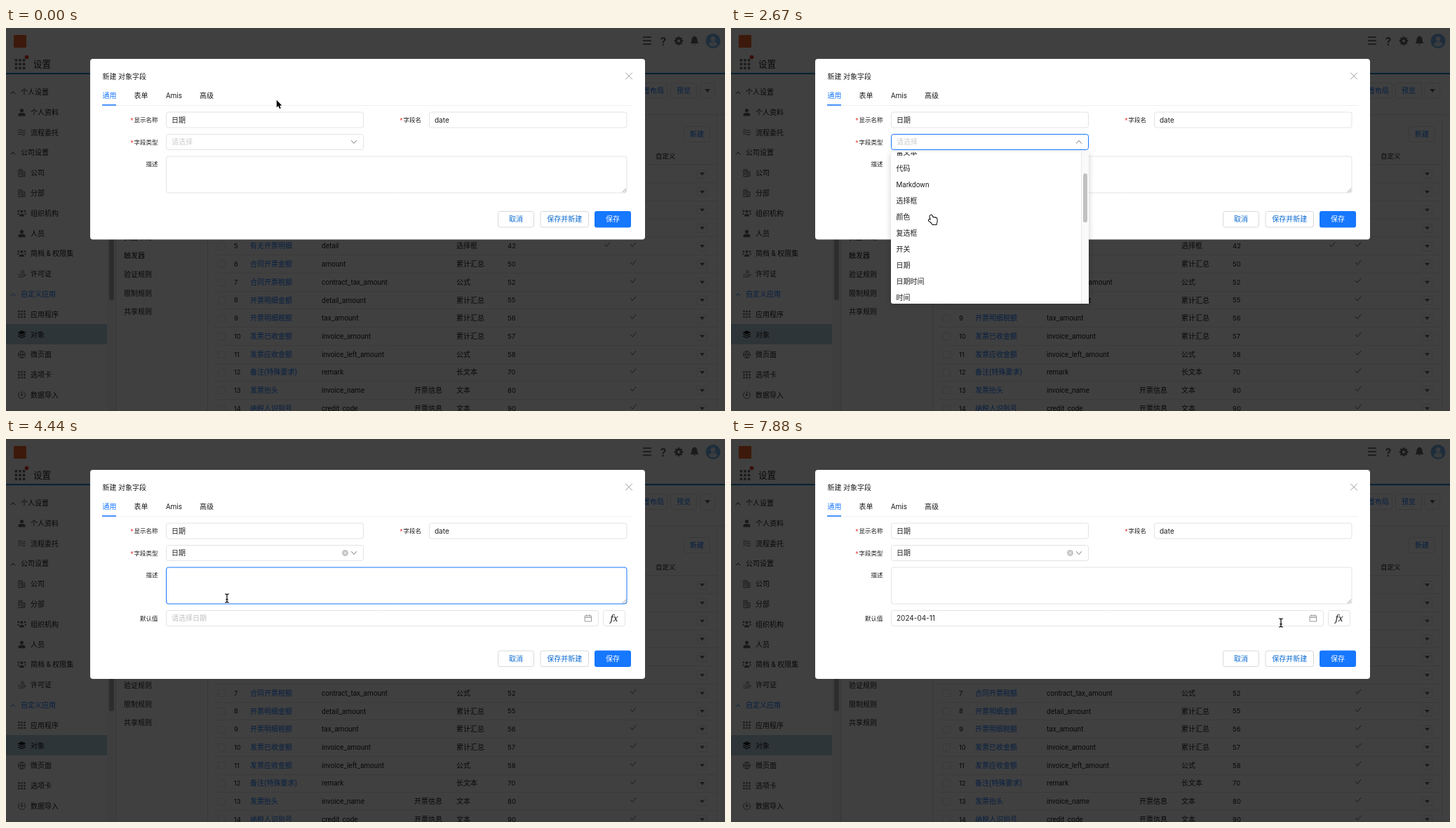
Write an HTML page with a canvas that moves like this. It is 1025 by 546 pixels and loops after 8000 ms.

```html
<!DOCTYPE html>
<html lang="zh-CN">
<head>
<meta charset="utf-8">
<title>新建 对象字段</title>
<style>
html, body { margin: 0; width: 100%; height: 100%; overflow: hidden; background: #404040; }
canvas { display: block; }
</style>
</head>
<body>
<canvas id="stage" width="1025" height="546"></canvas>
<script>
const c = document.getElementById('stage').getContext('2d');
const LOOP = 8000, BLUE = '#1677ff', INK = '#1f1f1f', LINE = '#e3e3e3', HINT = '#bfbfbf', GREY = '#666';
const CJK = '"Noto Sans CJK SC", "Noto Sans CJK", sans-serif';
const UI = 'Roboto, ' + CJK, FIELD = 'Inter, ' + CJK;

// ---- drawing helpers ----
function text(s, x, y, { size = 10, color = INK, align = 'left', weight = 400, font = UI } = {}) {
  c.font = `${weight} ${size}px ${font}`;
  c.textAlign = align;
  c.fillStyle = color;
  c.fillText(s, x, y + size * 0.37);
}
function rect(x, y, w, h, color) {
  c.fillStyle = color;
  c.fillRect(x, y, w, h);
}
// A stroke lies inside the given bounds; a plain fill covers them fully.
function box(x, y, w, h, { r = 3, fill = '#fff', stroke = LINE } = {}) {
  const inset = stroke ? 0.5 : 0;
  c.beginPath();
  c.roundRect(x + inset, y + inset, w - 2 * inset, h - 2 * inset, r);
  if (fill) { c.fillStyle = fill; c.fill(); }
  if (stroke) { c.strokeStyle = stroke; c.lineWidth = 1; c.stroke(); }
}
function field(x, y, w, h, active) {
  box(x, y, w, h, { stroke: active ? BLUE : LINE });
}
function panel(x, y, w, h) {
  c.save();
  c.shadowColor = 'rgba(0,0,0,.2)';
  c.shadowBlur = 8;
  c.shadowOffsetY = 2;
  box(x, y, w, h, { stroke: null });
  c.restore();
}
function dot(x, y, r, color) {
  c.fillStyle = color;
  c.beginPath();
  c.arc(x, y, r, 0, 7);
  c.fill();
}
function path(d, x, y, { stroke, fill, width = 1 } = {}) {
  const p = new Path2D(d);
  c.save();
  c.translate(x, y);
  c.lineJoin = c.lineCap = 'round';
  c.lineWidth = width;
  if (stroke) { c.strokeStyle = stroke; c.stroke(p); }
  if (fill) { c.fillStyle = fill; c.fill(p); }
  c.restore();
}
function dots(x, y, gap, size, color) {
  for (let i = 0; i < 9; i++)
    rect(x + (i % 3 - 1) * gap - size / 2, y + (Math.floor(i / 3) - 1) * gap - size / 2, size, size, color);
}

// ---- page behind the dialog ----
const ICONS = {
  user: 'M-2.6 -2.5a2.6 2.6 0 1 0 5.2 0a2.6 2.6 0 1 0 -5.2 0zM-5 5.5v-1.5q0 -3 3 -3h4q3 0 3 3v1.5z',
  users: 'M-2 -2.5a2 2 0 1 0 4 0a2 2 0 1 0 -4 0zM-3.5 4.5v-1q0 -2.5 3.5 -2.5t3.5 2.5v1zM-6 -3a1.4 1.4 0 1 0 2.8 0a1.4 1.4 0 1 0 -2.8 0zM3.2 -3a1.4 1.4 0 1 0 2.8 0a1.4 1.4 0 1 0 -2.8 0zM-6.3 2v-1q0 -1.5 2.5 -1.5l-.8 2.5zM6.3 2v-1q0 -1.5 -2.5 -1.5l.8 2.5z',
  layers: 'M0 -5.5l6 2.8l-6 2.8l-6 -2.8zM-6 0l1.5 -.7l4.5 2.1l4.5 -2.1l1.5 .7l-6 2.8zM-6 2.7l1.5 -.7l4.5 2.1l4.5 -2.1l1.5 .7l-6 2.8z'
};
const OUTLINES = {
  flow: 'M-5 -3q2.5 -2 5 0t5 0M-5 0q2.5 -2 5 0t5 0M-5 3q2.5 -2 5 0t5 0',
  bldg: 'M-4.5 5v-9.5h5v9.5zM.5 -1.5h4v6.5h-4M-3 -2.5h2M-3 -.3h2M-3 2h2M2 1h1M2 3h1',
  hand: 'M-5 1h2l2 1h3l3 -1.5M-5 4.5h7l4 -3M-1 -2.5a2 2 0 1 0 4 0a2 2 0 1 0 -4 0',
  globe: 'M-5 0a5 5 0 1 0 10 0a5 5 0 1 0 -10 0M-5 0h10M0 -5q-4 5 0 10M0 -5q4 5 0 10',
  down: 'M-3 -4a5 5 0 1 0 6 0M0 -5v6M-2 -1l2 2l2 -2'
};
const MENU = [
  ['个人设置'], ['个人资料', 'user'], ['流程委托', 'flow'],
  ['公司设置'], ['公司', 'bldg'], ['分部', 'bldg'], ['组织机构', 'users'], ['人员', 'user'],
  ['简档 & 权限集', 'users'], ['许可证', 'hand'],
  ['自定义应用'], ['应用程序', 'grid'], ['对象', 'layers'], ['微页面', 'globe'], ['选项卡', 'grid'], ['数据导入', 'down']
];
const ROWS = [
  ['有无开票明细', 'detail', '', '选择框', 42],
  ['合同开票金额', 'amount', '', '累计汇总', 50],
  ['合同开票税额', 'contract_tax_amount', '', '公式', 52],
  ['开票明细金额', 'detail_amount', '', '累计汇总', 55],
  ['开票明细税额', 'tax_amount', '', '累计汇总', 56],
  ['发票已收金额', 'invoice_amount', '', '累计汇总', 57],
  ['发票应收金额', 'invoice_left_amount', '', '公式', 58],
  ['备注(特殊要求)', 'remark', '', '长文本', 70],
  ['发票抬头', 'invoice_name', '开票信息', '文本', 80],
  ['纳税人识别号', 'credit_code', '开票信息', '文本', 90]
];

function header() {
  rect(11, 10, 18, 18, '#f0642a');
  dots(20, 51.5, 5.6, 3.4, GREY);
  dot(29.5, 41.5, 2.8, '#e5302a');
  text('设置', 39, 51.5, { size: 12.6 });
  for (const y of [13, 18, 23]) rect(908, y - 0.8, 12, 1.7, GREY);
  text('?', 937, 18.5, { size: 17, weight: 700, align: 'center', color: GREY });
  dot(959, 18.5, 4.8, GREY);
  for (let i = 0; i < 8; i++) {
    const a = i * Math.PI / 4;
    dot(959 + 5 * Math.cos(a), 18.5 + 5 * Math.sin(a), 1.4, GREY);
  }
  dot(959, 18.5, 2, '#fff');
  path('M-6 4q2 -2 2 -5q0 -4 3 -5q1 -1.5 2 0q3 1 3 5q0 3 2 5zM-1.5 5h3q-1.5 2.4 -3 0z', 981.5, 18, { fill: GREY });
  dot(1008, 18.5, 10.5, '#78b4ec');
  dot(1008, 15.5, 3.4, '#e2effb');
  path('M-6 6q0 -5 6 -5t6 5q-6 4 -12 0z', 1008, 18.5, { fill: '#e2effb' });
  rect(0, 64, 1025, 2, '#1589c9');
}

function sidebar() {
  rect(0, 422, 144, 29, '#b8d2e4');
  MENU.forEach(([label, icon], i) => {
    const y = 91.2 + i * 28.8, color = label === '自定义应用' ? BLUE : INK;
    text(label, icon ? 35 : 21, y, { color });
    if (!icon) path('M-3 1.5l3 -3l3 3', 10, y + 1, { stroke: color });
    else if (icon === 'grid') dots(22.5, y, 4, 2.4, GREY);
    else if (ICONS[icon]) path(ICONS[icon], 22.5, y, { fill: icon === 'layers' ? INK : GREY });
    else path(OUTLINES[icon], 22.5, y, { stroke: GREY });
  });
  rect(144, 66, 12, 480, '#f6f6f6');
  box(147, 90, 7, 298, { fill: '#b5b5b5', stroke: null });
  rect(156, 66, 1, 480, '#ddd');
  ['页面布局', '触发器', '验证规则', '限制规则', '共享规则'].forEach((s, i) => text(s, 168, 298 + i * 26.6));
  rect(287, 124, 1, 422, '#ddd');
}

function table() {
  const buttons = [['设置布局', 893, 78, 50], ['预览', 947, 78, 38], ['新建', 966, 140, 38]];
  for (const [s, x, y, w] of buttons) {
    box(x, y, w, 23);
    text(s, x + w / 2, y + 11, { align: 'center', color: BLUE });
  }
  box(989, 78, 22, 23);
  path('M-4 -2.5h8l-4 5z', 1000, 89.5, { fill: GREY });
  rect(288, 123, 737, 1, '#e0e0e0');
  rect(1013, 124, 1, 422, '#e6e6e6');
  text('自定义', 926, 182, { size: 9.5, weight: 500 });
  rect(296, 194, 717, 1, '#e2e2e2');
  for (let i = 0; i < 14; i++) {
    const y = 207.7 + i * 25.73, row = ROWS[i - 4];
    rect(296, Math.round(y + 12.5), 717, 1, '#e8e8e8');
    box(985, Math.round(y - 6), 15, 13, { r: 2 });
    path('M-3.5 -2h7l-3.5 4.5z', 992.5, y + 0.3, { fill: GREY });
    if (!row) continue;
    box(302, Math.round(y - 5), 11, 11, { r: 2 });
    text(i + 1, 325, y, { font: FIELD, size: 9.5 });
    text(row[0], 348, y, { color: BLUE });
    [450, 582, 642].forEach((x, k) => text(row[k + 1], x, y));
    text(row[4], 715, y, { font: FIELD, size: 9.5 });
    for (const x of i === 4 ? [857, 894] : [894])
      path('M-3.5 0l2.5 3l5 -6', x, y - 2, { stroke: GREY });
  }
}

function page() {
  rect(0, 0, 1025, 546, '#fff');
  header();
  sidebar();
  table();
  rect(0, 0, 1025, 546, 'rgba(0,0,0,.75)');
}

// ---- dialog ----
function label(s, right, y, required) {
  text(s, right, y, { size: 8.5, align: 'right' });
  if (!required) return;
  const left = right - c.measureText(s).width;
  text('*', left - 1, y + 1, { size: 9, align: 'right', color: '#e5302a' });
}
function chevron(x, y, up) {
  path(up ? 'M-3.5 2l3.5 -4l3.5 4' : 'M-3.5 -2l3.5 4l3.5 -4', x, y, { stroke: '#777' });
}

function dialog(s) {
  box(120, 44, 791, s.tall ? 298 : 257.5, { r: 4, stroke: null });
  text('新建 对象字段', 137.5, 69, { weight: 500 });
  path('M-4.5 -4.5l9 9M4.5 -4.5l-9 9', 888, 68.5, { stroke: '#999' });
  rect(137, 110, 757, 1, '#efefef');
  [['通用', 137.5], ['表单', 182.5], ['Amis', 228], ['高级', 276]].forEach(([t, x], i) =>
    text(t, x, 96.3, { color: i ? INK : BLUE }));
  rect(137, 109, 20, 1.5, BLUE);

  label('显示名称', 216.5, 131, true);
  field(228, 119.5, 282, 23);
  text('日期', 236, 131);
  label('字段名', 592, 131, true);
  field(603, 119.5, 282.5, 23);
  text('date', 611, 131, { font: FIELD });

  label('字段类型', 216.5, 162.5, true);
  field(228, 151, 282, 23, s.select);
  text(s.picked ? '日期' : '请选择', 236, 162.5, { color: s.picked ? INK : '#ccc' });
  if (s.picked) {
    dot(483.5, 162.5, 4.5, '#c4c4c4');
    path('M-1.6 -1.6l3.2 3.2M1.6 -1.6l-3.2 3.2', 483.5, 162.5, { stroke: '#fff' });
  }
  chevron(496, 162.5, s.open);

  label('描述', 216.5, 194);
  field(228, 182.5, 657.5, 53, s.area);
  path('M-5 0l5 -5M-2 0l2 -2', 884, 234, { stroke: '#888', width: 0.8 });

  if (s.tall) {
    label('默认值', 216.5, 255.5);
    field(228, 244, 617, 23, s.date);
    if (s.filled) text('2024-04-11', 236, 255.5, { font: FIELD });
    else text('请选择日期', 236, 255.5, { color: HINT });
    if (s.caret) rect(236, 249, 1, 13, INK);
    path('M-4.5 -3.5h9v8h-9zM-4.5 -1h9M-2 -5v2.5M2 -5v2.5', 830, 255.5, { stroke: '#999' });
    field(851, 244, 32, 23);
    text('fx', 867, 255.5, { size: 13, align: 'center', weight: 'italic 500', font: '"Noto Serif", serif' });
  }

  const y = s.tall ? 301.5 : 261;
  for (const [t, x, w] of [['取消', 701, 52], ['保存并新建', 761.5, 69.5], ['保存', 839, 52]]) {
    const main = t === '保存';
    box(x, y, w, 23.5, { fill: main ? BLUE : '#fff', stroke: main ? null : '#d9d9d9' });
    text(t, x + w / 2, y + 11.7, { align: 'center', color: main ? '#fff' : '#0b6ad0' });
  }
}

const TYPES = ['文本', '长文本', '富文本', '代码', 'Markdown', '选择框', '颜色', '复选框', '开关', '日期', '日期时间', '时间', '数值'];
function dropdown(scroll) {
  panel(228, 177, 282, 216);
  c.save();
  c.beginPath();
  c.rect(228, 177, 282, 216);
  c.clip();
  c.save();
  c.translate(0, -scroll);
  path('M-4.5 -.5a4 4 0 1 0 8 0a4 4 0 1 0 -8 0M2.5 2.5l3 3', 240, 191, { stroke: '#777' });
  rect(248, 186, 1, 11, INK);
  text('搜索', 249, 191.5, { size: 8.6, color: HINT });
  rect(236, 201, 256, 1, '#ececec');
  TYPES.forEach((t, i) => text(t, 235.5, 213 + i * 23));
  c.restore();
  rect(499, 177, 11, 216, '#fafafa');
  rect(499, 177, 1, 216, '#e8e8e8');
  box(502, 179.5 + scroll * 0.34, 6, 70, { r: 3, fill: '#c1c1c1', stroke: null });
  c.restore();
}

function calendar(hover) {
  panel(228, 269, 173, 196);
  text('2024年 4月', 314.5, 283.5, { align: 'center', weight: 500 });
  path('M0 -3l-3 3l3 3M4 -3l-3 3l3 3M14 -2.5l-2.5 2.5l2.5 2.5M132 -2.5l2.5 2.5l-2.5 2.5M141 -3l3 3l-3 3M145 -3l3 3l-3 3', 239.5, 283.5, { stroke: '#aaa' });
  rect(228, 297, 173, 1, '#ececec');
  const colX = i => 248 + i * 22.15;
  [...'一二三四五六日'].forEach((d, i) => text(d, colX(i), 313, { size: 9, align: 'center' }));
  for (let i = 0; i < 42; i++) {
    const n = i - 6, x = colX(i % 7), y = 335.5 + Math.floor(i / 7) * 23.15;
    const inside = n > 0 && n <= 30;
    if (n === hover) box(x - 9, y - 9, 18, 18, { r: 2, fill: '#f0f1f3', stroke: null });
    if (n === 18) box(306, 396, 17, 17, { r: 1, stroke: BLUE });
    text(inside ? n : n < 1 ? n + 31 : n - 30, x, y, { size: 8.8, align: 'center', font: FIELD, color: inside ? INK : HINT });
  }
}

// ---- pointer ----
const POINTERS = {
  arrow: () => path('M0 0v10.5l2.4 -2.2l1.7 4l1.9 -.9l-1.7 -3.8h3.2z', 0.8, 0.8, { stroke: '#fff', fill: '#000', width: 1.6 }),
  hand: () => path('M-2.6 -6.2q1.2 -1 2 .4l1.4 3q1 -1 1.9 .1q1 -.8 1.8 .3q1.2 -.5 1.6 .9l.4 3q0 2.5 -1 3.6v1.6h-5.4q-.8 -2 -2.8 -3.4l-2.6 -2.2q-.2 -1.6 1.5 -1.3l1.6 .9l-1.6 -5.2q-.2 -1.2 1.2 -1.7zM.8 1.8v2.6M2.6 1.6v2.8M4.2 1.8v2.4', 0, 0, { fill: '#fff', stroke: '#000', width: 2 }),
  beam: () => {
    const d = 'M-2.5 -6q2.5 0 2.5 1.5v9q0 1.5 -2.5 1.5M2.5 -6q-2.5 0 -2.5 1.5M0 4.5q0 1.5 2.5 1.5M-1.2 1.8h2.4';
    path(d, 0, 0, { stroke: '#fff', width: 2.6 });
    path(d, 0, 0, { stroke: '#000', width: 1.2 });
  }
};
// time, x, y, shape from then on
const TRACK = [
  [0, 385, 102, 'arrow'], [300, 385, 102, 'arrow'], [590, 365, 140, 'arrow'], [740, 335, 190, 'beam'],
  [890, 318, 206, 'beam'], [1040, 310, 200, 'beam'], [1190, 302, 176, 'arrow'], [1340, 298, 166, 'hand'],
  [1490, 297, 168, 'hand'], [1930, 293, 253, 'hand'], [2530, 293, 253, 'hand'], [3110, 269, 337, 'hand'],
  [3550, 269, 337, 'arrow'], [3850, 269, 337, 'arrow'], [4290, 310, 232, 'beam'], [4440, 315, 227, 'beam'],
  [4740, 330, 228, 'beam'], [5040, 450, 244, 'beam'], [5340, 620, 264, 'beam'], [5640, 688, 262, 'beam'],
  [5800, 688, 260, 'beam'], [5930, 680, 262, 'beam'], [6080, 600, 290, 'arrow'], [6380, 360, 378, 'hand'],
  [6530, 320, 382, 'hand'], [6680, 316, 382, 'hand'], [6980, 316, 382, 'arrow'], [7430, 424, 289, 'arrow'],
  [7610, 424, 289, 'arrow'], [7730, 620, 268, 'beam'], [7880, 784, 262, 'beam'], [LOOP, 784, 262, 'beam']
];
function pointer(t) {
  const i = TRACK.findLastIndex(k => k[0] <= t);
  const a = TRACK[i], b = TRACK[i + 1] || a, u = b === a ? 0 : (t - a[0]) / (b[0] - a[0]);
  c.save();
  c.translate(a[1] + (b[1] - a[1]) * u, a[2] + (b[2] - a[2]) * u);
  POINTERS[a[3]]();
  c.restore();
}

// ---- timeline: the picture only changes on these beats ----
const BEATS = [0];
for (const [from, to, n] of [[440, 1340, 7], [1490, 1930, 4], [2230, 3110, 7], [3550, 4590, 8],
  [4740, 5640, 7], [5800, 6830, 8], [6980, 7430, 4], [7730, 7880, 2]])
  for (let i = 0; i < n; i++) BEATS.push(Math.round((from + (to - from) * i / (n - 1)) / 10) * 10);

function draw(t) {
  const during = (a, b) => t >= a && t < b;
  const easeOut = u => 1 - (1 - u) ** 2;
  const s = {
    select: during(1190, 3850),
    open: during(1490, 3700),
    picked: t >= 3700,
    tall: t >= 3850,
    area: during(740, 1190) || during(4290, 5040),
    date: during(5190, 7130),
    caret: during(5800, 6230),
    filled: t >= 6980
  };
  page();
  dialog(s);
  if (s.open) dropdown(85 * easeOut(Math.min(1, Math.max(0, (t - 2080) / 740))));
  if (during(5930, 6980)) calendar(t < 6380 ? 0 : t < 6680 ? 12 : 11);
  pointer(t);
}

const start = performance.now();
function frame() {
  const t = (performance.now() - start) % LOOP;
  draw(BEATS.findLast(b => b <= t));
  requestAnimationFrame(frame);
}
frame();
</script>
</body>
</html>
```
